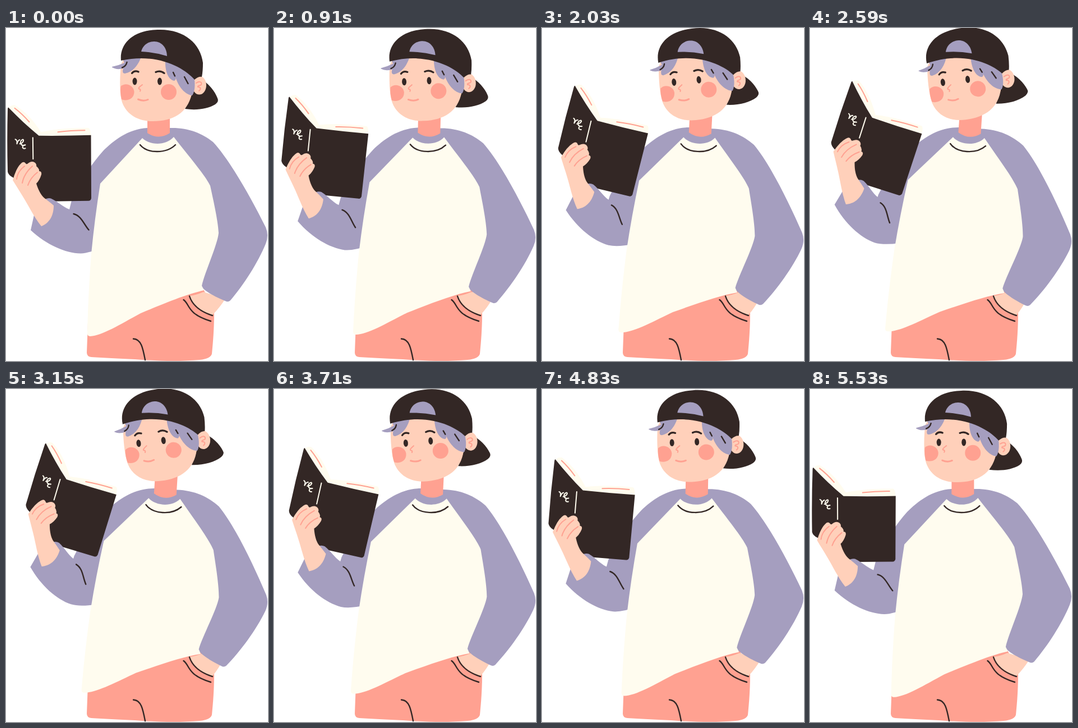
These frames come from a looping animation (467 px wide and 593 px high, 5.6 s). An HTML page:

```html
<!DOCTYPE html>
<html lang="en">
<head>
<meta charset="utf-8">
<title>Reader</title>
<style>
  html, body { margin: 0; width: 100%; height: 100%; overflow: hidden; background: #fff; }
  svg { display: block; width: 100vw; height: 100vh; }
  .ink { fill: #332725; }
  .lilac { fill: #a59ebf; }
  .skin { fill: #ffd0ba; }
  .coral { fill: #ffa191; }
  .cream { fill: #fffcef; }
  .line { fill: none; stroke: #332725; stroke-width: 2.4; stroke-linecap: round; stroke-linejoin: round; }
  .pink { stroke: #ffa191; stroke-width: 2; }
  .chalk { stroke: #fffcef; stroke-width: 2; }
</style>
</head>
<body>
<svg viewBox="0 0 467 593">
  <!-- trousers and pocket -->
  <path class="coral" d="M146 525 L330 473 L352 465 L371 508 C371 535 369 560 367 580 Q365 589 345 591 C310 594 270 593 230 590 C200 589 175 587 152 586 Q144 585 144 578 Z"/>
  <path class="line" d="M227 553.500 C241 554 244 570 248 591"/>
  <path id="palm" class="skin"/>

  <!-- sleeves behind the shirt front -->
  <g class="torso">
    <path class="lilac" d="M252 178 C217 180 191 201 173 219 C150 245 130 276 117 307 L113 323 L153 380 L200 400 L250 440 L348 459 C351 467 371 478 393 487 Q397 488 400 485 C424 457 449 418 463 384 Q469 369 463 355 C437 303 399 235 369 203 C349 187 324 177 292 178 Z"/>
  </g>

  <!-- forearm with book -->
  <g id="arm">
    <g transform="translate(1.5 0.3)">
      <path class="cream" d="M3 142 Q8 136 14 137 C31 147 46 162 61 185 C88 179 118 178 145 177.500 Q149 178 150 192 L57 193 Z"/>
      <path class="ink" d="M2.500 141 C20 159 38 176 57 191.500 Q104 192 150 190.500 L150.500 303 Q149.500 307.500 145.500 307.500 L78 308.500 Q68 307 60 300 L11 266 Q3 262 1.500 256 Q0 200 1.500 143 Z"/>
      <path class="line pink" d="M14 142.500 C24 150 32 158 40 167 M91 185 Q114 182 139 182"/>
      <path class="line chalk" d="M46.300 195 L46.800 233"/>
      <path class="line chalk" d="M15 198 Q19 199 18 206 Q20 199 23 199 M23 206 C31 204 31 196 27 199 C22 203 25 211 33 208 C27 208 26 216 33 214"/>
    </g>
    <path class="lilac" d="M50 333 L44 360 C72 386 106 401 133 401.500 Q150 401 176 388 L170 340 L113 323 C102 319 92 309 80 303.500 Q74 302 68 306 Z"/>
    <path class="line" d="M120.500 331 C134 334 139 350 147.500 359.500"/>
    <path class="skin" d="M12 271 Q18 250 26 242 Q31 236 35 241 Q36 243 38 242 Q46 235 52 240 Q55 243 54 246 Q60 251 59 255 Q64 255 63 261 Q60 271 54 277 C58 290 64 300 70 304 Q78 310 85 316 C85 336 76 348 63 353 C50 337 40 316 30 300 C24 290 18 281 12 271 Z"/>
    <path class="line pink" d="M33 246 C25 252 20 260 19 269 M47 246 C37 255 31 265 29 276 M56 257 C47 264 42 271 39 280"/>
  </g>

  <!-- neck and shirt front -->
  <g class="torso">
    <path class="coral" d="M252 145 H292 V187 Q272 200 252 187 Z"/>
    <path class="cream" d="M243 196 C256 209 285 210 299 194 C324 226 355 262 364 281 C368 300 378 342 379 365 C377 386 354 436 349 459 L353 467 C322 474 288 488 240 508 C203 528 171 548 150 549 Q144 549 145 541 C146 495 149 440 152 402 Q158 340 168 277 L243 196 Z"/>
    <path class="line" d="M239 208 C252 224 286 224 302 208"/>
  </g>
  <path class="line" d="M327 477.500 C333 496 349 506 368 512 M316.500 484 C328 492 322 509 365 522"/>

  <g id="head">
    <path class="ink" d="M345 90 C362 98 373 114 377 125 Q380 131 373 136 C360 144 340 147 319 144 Z"/>
    <path class="skin" d="M205 65 C203 85 202 112 206 129 C213 154 236 166.500 262 166 C297 166 323 152 331 118 L340 90 L330 45 L215 45 Z"/>
    <ellipse class="skin" cx="344.500" cy="102" rx="12.500" ry="16.500"/>
    <path class="line pink" d="M339 98 C345 94 350 96 348 101 C346 103 341 102 342 105 C346 105 349 108 344 112"/>
    <path class="lilac" d="M189 69 Q200 67 211 62 L206 50 L242 48 C237 65 227 78 212 81 Q206 81 209 72 Q197 75 189 70 Z"/>
    <path class="lilac" d="M284 56 C283 77 289 92 300 94 Q304 92 302 87 C307 104 319 119 332 120 C338 111 337 97 335 83 Z"/>
    <path class="line" d="M215.500 61 Q214 68 207 70.500 M298 79 L301 85.500 M318 87 L324.500 99"/>
    <path class="ink" d="M205 58 C202 28 226 4 270 3 C316 1 347 27 351 62 Q351 77 349 87 Q343 86 336 92 C320 73 272 43 205 58 Z"/>
    <path class="lilac" d="M241 42 C244 30 254 24 264 24 C278 24 287 36 287 50 Q264 43 241 42 Z"/>
    <path class="coral" d="M204.500 104 C213 96 228 102 228.500 114 C228 127 215 131 206 127 Q203 115 204.500 104 Z"/>
    <circle class="coral" cx="290" cy="114" r="14"/>
    <ellipse class="ink" cx="229.500" cy="95" rx="4" ry="6.500"/>
    <ellipse class="ink" cx="274" cy="95" rx="4" ry="6.500"/>
    <path class="line" style="stroke-width:3.200" d="M224.500 80.500 Q229 75 236 78 M267 78.500 Q275 75 282 80.500"/>
    <path class="line pink" d="M243 101 C239 104 235 107 237 108.500 Q241 109 239 112.500"/>
    <path class="line pink" style="stroke-width:3" d="M235.500 127 Q245 131 253 127.500"/>
  </g>
</svg>
<script>
  const LOOP = 5600, STEP = 70;
  const arm = document.getElementById('arm');
  const head = document.getElementById('head');
  const palm = document.getElementById('palm');
  const torso = document.querySelectorAll('.torso');

  const turn = (el, deg, x, y) => el.setAttribute('transform', `rotate(${deg} ${x} ${y})`);

  function draw(ms) {
    const t = Math.floor((ms % LOOP) / STEP) * STEP;
    const p = 1 - Math.abs(1 - 2 * t / LOOP); // steady swing there and back
    turn(arm, 20 * p, 183.4, 336.5);
    turn(head, -7.5 * p, 248, 35);
    torso.forEach(el => turn(el, 4.1 * p, 275, 375));
    palm.setAttribute('d', `M327 477 Q338 476 352 470 L${391 - 5 * p} 482 Q${381 - 2 * p} 498 368 511 Q337 501 327 477 Z`);
  }

  const start = performance.now();
  function tick() {
    draw(performance.now() - start);
    requestAnimationFrame(tick);
  }
  draw(0);
  requestAnimationFrame(tick);
</script>
</body>
</html>
```
